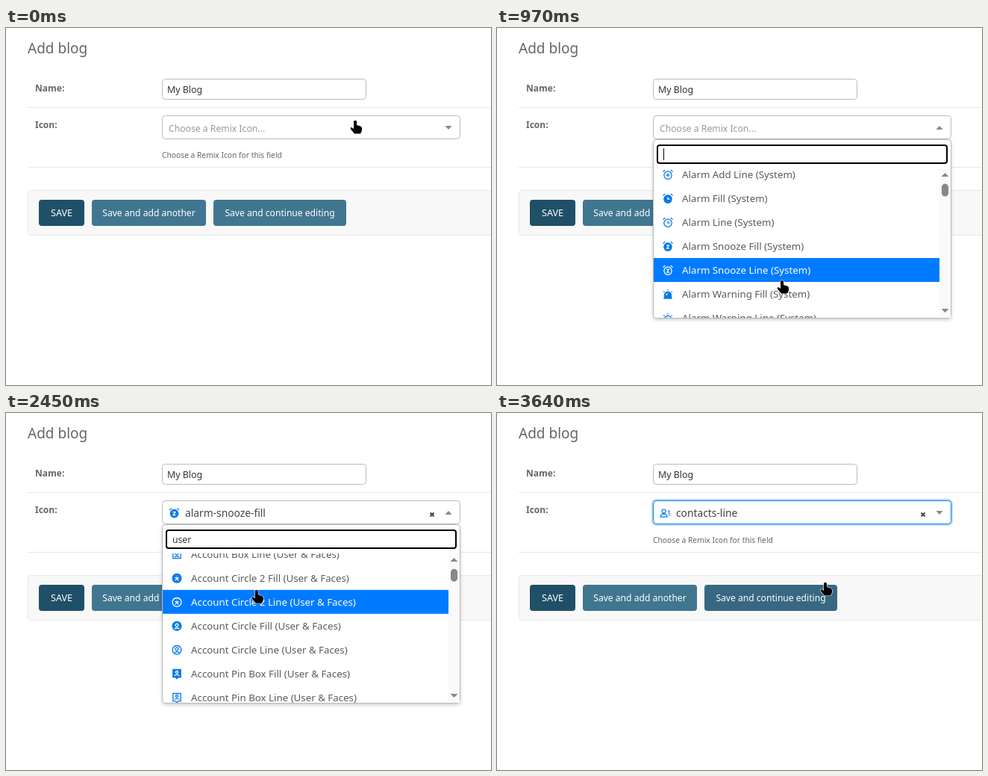
Write an HTML page that moves like this. It is 650x478 px and loops after 3670 ms.

```html
<!DOCTYPE html>
<html lang="en">
<head>
<meta charset="utf-8">
<title>Add blog</title>
<style>
  html, body { margin: 0; width: 650px; height: 478px; overflow: hidden; background: #fff; }
  svg { display: block; }
  text { font: 12.2px "Noto Sans", "Open Sans", sans-serif; fill: #666; white-space: pre; }
  .label { font-weight: 700; font-size: 12px; }
  .button { fill: #fff; font-size: 12.1px; text-anchor: middle; }
  .field { fill: #fff; stroke: #bbb; }
  .rule { stroke: #e8e8e8; fill: #f8f8f8; }
  .entry { fill: #333; }
  .row { --ink: #0a7aea; --paper: #fff; }
  .row text { font-size: 13.3px; fill: #5a5a5a; }
  .row .bar { fill: none; }
  .row.on { --ink: #fff; --paper: #007bff; }
  .row.on text { fill: #fff; }
  .row.on .bar { fill: #007bff; }
  .icon path { fill: none; stroke: var(--ink); stroke-width: 2; }
  .icon.solid .body { fill: var(--ink); }
  .icon.solid .mark { stroke: var(--paper); }
  #value text { font-size: 13.8px; fill: #444; }
  .arrow { fill: #888; }
  #pointer path { fill: #000; stroke: #fff; stroke-width: 1.2; paint-order: stroke; }
</style>
</head>
<body>
<svg width="650" height="478" viewBox="0 0 650 478">
  <defs>
    <clipPath id="listClip"><rect x="210" y="188" width="398" height="200"/></clipPath>
    <filter id="shadow" x="-5%" y="-5%" width="110%" height="112%">
      <feDropShadow dx="0" dy="2" stdDeviation="2" flood-opacity=".2"/>
    </filter>
  </defs>

  <text x="29" y="34" style="font-size:19px;font-weight:300">Add blog</text>
  <text class="label" x="39" y="85">Name:</text>
  <rect class="field" x="209.5" y="68.5" width="273" height="27" rx="4"/>
  <text class="entry" x="216" y="87" style="font-size:12.35px">My Blog</text>
  <path class="rule" d="M29 106.5H650M29 186.5H650"/>
  <text class="label" x="39" y="134">Icon:</text>
  <text x="209" y="174" style="font-size:10.26px">Choose a Remix Icon for this field</text>

  <rect class="rule" x="29.5" y="217.5" width="640" height="60" rx="4"/>
  <rect x="44" y="230" width="61" height="35" rx="4" fill="#205067"/>
  <rect x="115" y="230" width="153" height="35" rx="4" fill="#417690"/>
  <rect id="continue" x="278" y="230" width="178" height="35" rx="4"/>
  <text class="button" x="74.5" y="252" style="font-size:12.6px">SAVE</text>
  <text class="button" x="191.5" y="252">Save and add another</text>
  <text class="button" x="367" y="252">Save and continue editing</text>

  <rect id="glow" x="208.5" y="116.5" width="401" height="33" rx="5" fill="none" stroke="#007bff" stroke-opacity=".3" stroke-width="3"/>
  <rect id="select" class="field" x="209.5" y="117.5" width="399" height="31" rx="4"/>
  <text id="placeholder" x="218" y="139" style="fill:#999">Choose a Remix Icon...</text>
  <g id="value"></g>
  <path id="toggle" class="arrow"/>

  <g id="dropdown">
    <rect class="field" x="209.5" y="149.5" width="399" height="239" rx="4" filter="url(#shadow)"/>
    <rect x="215" y="157" width="388" height="24" rx="3" fill="#fff" stroke="#000" stroke-width="2"/>
    <text id="query" class="entry" x="223" y="174"></text>
    <path id="caret" d="M.5 161v16" stroke="#000"/>
    <g id="list" clip-path="url(#listClip)"></g>
    <rect x="593" y="188" width="15" height="200" fill="#fafafa"/>
    <path class="arrow" d="M595.5 199h10l-5-5zM595.5 376h10l-5 5z"/>
    <rect id="thumb" class="arrow" x="596" width="9" height="17" rx="4.5"/>
  </g>
  <g id="pointer"><path/></g>
</svg>

<script>
const LOOP = 3670, ROW = 32, TOP = 188;
const $ = id => document.getElementById(id);
const show = (el, on) => el.style.display = on ? '' : 'none';

// Icon outlines on a 24-unit grid
const disc = 'M12 3a9 9 0 1 0 .01 0z', box = 'M4 4h16v16H4z';
const person = 'M12 7a3 3 0 1 0 .01 0zM7 18a6 5 0 0 1 10 0', plus = 'M12 8v8M8 12h8';
const clock = 'M12 5a8 8 0 1 0 .01 0zM2 6l4-4M22 6l-4-4';
const user = 'User & Faces', system = 'System';
const families = [
  ['Account Box', user, box, person],
  ['Account Circle 2', user, disc, 'M12 7v1M8 11h8M12 11l-3 6M12 11l3 6'],
  ['Account Circle', user, disc, person],
  ['Account Pin Box', user, 'M4 3h16v16h-5l-3 3-3-3H4z', 'M12 6a2.5 2.5 0 1 0 .01 0zM7 16a6 5 0 0 1 10 0'],
  ['Account Pin Circle', user, 'M12 22l-4-4.5a8 8 0 1 1 8 0z', 'M12 6a2 2 0 1 0 .01 0zM8 15a5 4 0 0 1 8 0'],
  ['Add Box', system, box, plus],
  ['Add Circle', system, disc, plus],
  ['Add', system, 'M12 5v14M5 12h14', ''],
  ['Admin', user, 'M11 3a4 4 0 1 0 .01 0zM4 21a8 8 0 0 1 8-8M14 17h7v5h-7zM15.5 17v-2a2 2 0 0 1 4 0v2', ''],
  ['Advertisement', 'Business', 'M3 4h18v16H3z', 'M6 16l3-8 3 8M7 14h4M18 8v8a2 2 0 1 1 0-4'],
  ['Airplay', 'Media', 'M7 17H3V4h18v13h-4M12 15l5 6H7z', ''],
  ['Alarm Add', system, clock, 'M12 9v8M8 13h8'],
  ['Alarm', system, clock, 'M12 9v4h4'],
  ['Alarm Snooze', system, clock, 'M9 10h5l-4 6h5'],
  ['Alarm Warning', system, 'M5 20v-6a7 7 0 0 1 14 0v6zM3 20.5h18M12 2v2M3 6l2 1.5M21 6l-2 1.5', 'M9 14a3 3 0 0 1 3-3'],
  ['Album', 'Media', disc, 'M12 10a2 2 0 1 0 .01 0z'],
  ['Aliens', user, 'M12 3c5 0 8 3 8 7 0 5-5 11-8 11S4 15 4 10c0-4 3-7 8-7z', 'M7 11c2 0 4 1.5 4 4M17 11c-2 0-4 1.5-4 4'],
  ['Bear Smile', user, 'M6 4a3 3 0 0 0-3 5c-1 9 3 12 9 12s10-3 9-12a3 3 0 0 0-5-4H8a3 3 0 0 0-2-1z', 'M9 14a3 3 0 0 0 6 0'],
  ['Body Scan', user, 'M3 8V3h5H3zM16 3h5v5V3zM21 16v5h-5h5zM8 21H3v-5v5zM12 6a1.5 1.5 0 1 0 .01 0zM7 11h10M10 11v7h4v-7', ''],
  ['Contacts', user, 'M9 4a4 4 0 1 0 .01 0zM2 20a7 6.5 0 0 1 14 0zM17 8h5M18 12h4M19 16h3', ''],
  ['Criminal', user, disc, 'M8.5 9v2M15.5 9v2M9 16h6'],
  ['Emotion 2', user, disc, 'M7 13a5 5 0 0 0 10 0z'],
  ['Emotion', user, disc, 'M8 14a4 3 0 0 0 8 0M9 8v2M15 8v2'],
];

const iconMarkup = (r, x, y) =>
  `<g class="icon ${r.solid ? 'solid' : ''}" transform="translate(${x} ${y}) scale(.65) translate(-12 -12)">
   <path class="body" d="${r.body}"/><path class="mark" d="${r.mark}"/></g>`;

const rows = families.flatMap(([name, group, body, mark]) => ['Fill', 'Line'].map(style => {
  const r = { name: `${name} ${style}`, solid: style === 'Fill', body, mark };
  r.label = `${r.name} (${group})`;
  r.el = document.createElementNS('http://www.w3.org/2000/svg', 'g');
  r.el.innerHTML = `<rect class="bar" x="210" width="383" height="${ROW}"/>${iconMarkup(r, 229, 16.5)}
    <text x="248" y="21">${r.label.replace('&', '&amp;')}</text>`;
  $('list').append(r.el);
  return r;
}));

const pointers = {
  hand: 'M-2 1q2-2.5 4 0v5l5 1.5q2 .5 2 3v3l-2 4H-1L-6 11.5q-1-2 1-2.5l3 2z',
  arrow: 'M0 0v15l3.5-3 2.5 6 3-1.3-2.5-5.7h5z',
  beam: 'M-3-8h6v1H.5v14H3v1h-6v-1h2.5v-14H-3z',
};

// Value of a [time, ...values] track at time t
function at(track, t, ease = p => p) {
  const i = track.findIndex(k => k[0] > t);
  if (i < 0) return track.at(-1).slice(1);
  if (!i) return track[0].slice(1);
  const [a, b] = [track[i - 1], track[i]], p = ease((t - a[0]) / (b[0] - a[0]));
  return a.slice(1).map((v, j) => v + (b[j + 1] - v) * p);
}
const smooth = p => p * p * (3 - 2 * p);

const path = [
  [0, 468, 124], [150, 468, 126], [580, 449, 227], [970, 382, 338], [1170, 372, 300], [1330, 370, 295],
  [1620, 352, 138], [1800, 350, 140], [1940, 348, 154], [2300, 346, 154], [2500, 334, 252],
  [2760, 334, 252], [3050, 369, 275], [3330, 369, 275], [3640, 440, 227],
];
const scrolling = [
  [490, 0], [580, 45], [950, 744], [1789, 744], [1790, 788], [2149, 788], [2150, 0],
  [2420, 0], [2650, 350], [2760, 350], [3000, 536],
];
let shownValue;

function setValue(row) {
  if (shownValue === row) return;
  shownValue = row;
  $('value').innerHTML = row ? `<g class="row">${iconMarkup(row, 225.5, 134)}</g>
    <text x="240" y="139">${row.name.toLowerCase().replace(/ /g, '-')}</text>
    <path d="M568.5 133.5l5 5m0-5l-5 5" stroke="#444" stroke-width="2"/>` : '';
}

function draw(t) {
  const [x, y] = at(path, t, smooth), [scroll] = at(scrolling, t);
  const open = t >= 150 && t < 1330 || t >= 1790 && t < 3360;
  const query = 'user'.slice(0, t < 2150 ? 0 : 1 + Math.floor((t - 2150) / 60));
  const chosen = t < 1330 ? null : rows.find(r => r.name === (t < 3360 ? 'Alarm Snooze Fill' : 'Contacts Line'));

  const matches = rows.filter(r => r.label.toLowerCase().includes(query));
  const first = Math.max(0, matches.indexOf(chosen));
  const active = y > TOP ? Math.floor((y - TOP + scroll) / ROW) : first;
  for (const r of rows) {
    const i = matches.indexOf(r);
    show(r.el, i >= 0);
    r.el.setAttribute('transform', `translate(0 ${TOP + i * ROW - scroll})`);
    r.el.setAttribute('class', i === active ? 'row on' : 'row');
  }
  const total = query ? 134 : 2271;
  $('thumb').setAttribute('y', 207 + 153 * scroll / (total * ROW - 200));

  show($('dropdown'), open);
  $('query').textContent = query;
  show($('caret'), t % 490 > 245);
  $('caret').setAttribute('transform', `translate(${223 + (query && open ? $('query').getComputedTextLength() : 0)} 0)`);

  setValue(chosen);
  show($('placeholder'), !chosen);
  const focused = !open && t >= 150;
  show($('glow'), focused);
  $('select').style.stroke = focused ? '#1583d8' : '';
  $('toggle').setAttribute('d', open ? 'M588.5 136h9l-4.5-5z' : 'M588.5 131h9l-4.5 5z');

  const within = (l, u, r, d) => x >= l && x <= r && y >= u && y <= d;
  const onButton = !open && within(278, 226, 456, 265);
  $('continue').setAttribute('fill', onButton ? '#386881' : '#417690');
  const kind = open && within(215, 157, 603, 181) ? 'beam'
    : onButton || within(209, 117, 609, 149) || open && y > TOP ? 'hand' : 'arrow';
  $('pointer').setAttribute('transform', `translate(${x} ${y})`);
  $('pointer').firstElementChild.setAttribute('d', pointers[kind]);
}

const start = performance.now();
function tick() {
  draw((performance.now() - start) % LOOP);
  requestAnimationFrame(tick);
}
tick();
</script>
</body>
</html>
```
